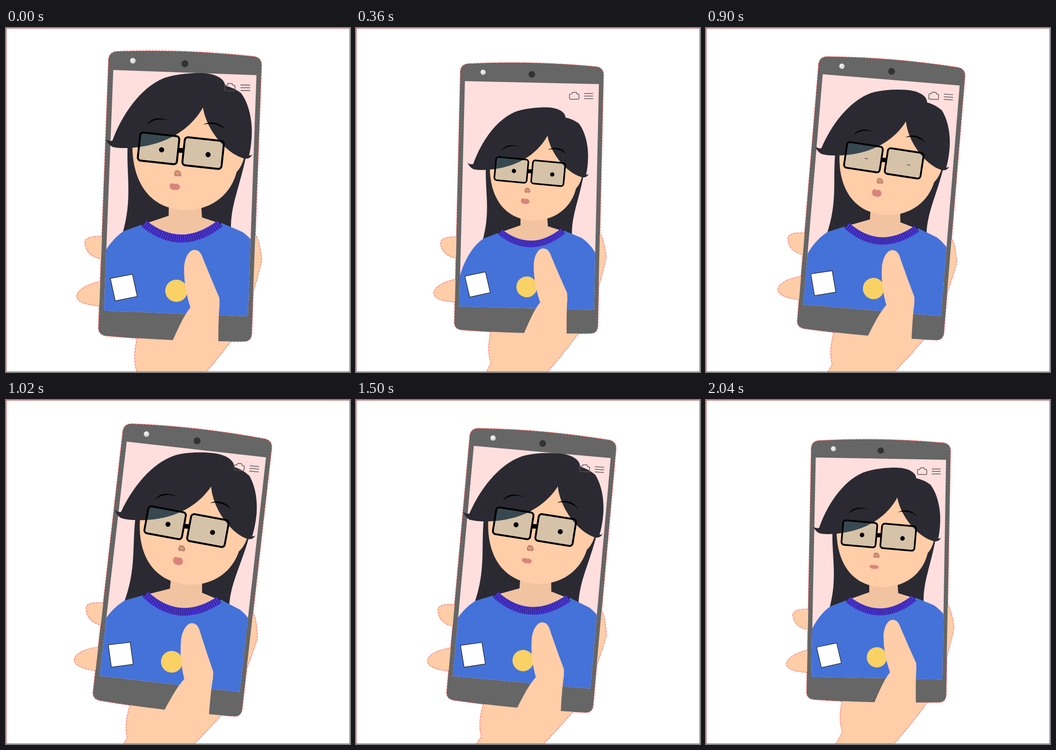
An HTML page with a canvas for the animation above (2100 ms loop, 748 by 748 pixels).

```html
<!DOCTYPE html>
<html lang="en">
<head>
<meta charset="utf-8">
<title>Selfie</title>
<style>
  html, body { margin: 0; width: 100%; height: 100%; overflow: hidden; background: #fff; }
  canvas { display: block; width: 748px; height: 748px; }
</style>
</head>
<body>
<canvas id="stage" width="748" height="748"></canvas>
<script>
const ctx = document.getElementById('stage').getContext('2d');
const LOOP = 2100, STEP = 60;
const SKIN = '#ffcda8', HAIR = '#2b2a32', GREY = '#666', FRINGE = '#ff5656';

// Smooth monotone curve through [time, value] keys
function track(keys) {
  const n = keys.length, gaps = [], slopes = new Array(n).fill(0);
  for (let i = 0; i < n - 1; i++) {
    gaps.push((keys[i + 1][1] - keys[i][1]) / (keys[i + 1][0] - keys[i][0]));
  }
  slopes[0] = gaps[0];
  for (let i = 1; i < n - 1; i++) {
    const a = gaps[i - 1], b = gaps[i];
    slopes[i] = a * b > 0 ? 2 * a * b / (a + b) : 0;
  }
  return t => {
    let i = 0;
    while (i < n - 2 && t > keys[i + 1][0]) i++;
    const [t0, v0] = keys[i], [t1, v1] = keys[i + 1], d = t1 - t0;
    const u = Math.min(1, Math.max(0, (t - t0) / d)), u2 = u * u, u3 = u2 * u;
    return v0 * (2 * u3 - 3 * u2 + 1) + v1 * (3 * u2 - 2 * u3)
      + d * (slopes[i] * (u3 - 2 * u2 + u) + slopes[i + 1] * (u3 - u2));
  };
}

const phoneScale = track([[0, 1.099], [180, 1.053], [400, 1.026], [660, 1.022], [900, 1.054],
  [1080, 1.081], [1200, 1.082], [1320, 1.079], [1500, 1.054], [1620, 1.027], [1820, 1.002], [2040, 1]]);
const phoneTilt = track([[0, 1.07], [180, 0.62], [400, 0.25], [660, 0.18], [900, 3.67],
  [1080, 5.85], [1200, 5.92], [1320, 5.75], [1500, 4.07], [1620, 2.1], [1820, 0.12], [2040, 0]]);
const girlScale = track([[0, 1.046], [180, 0.965], [400, 0.918], [660, 0.91], [900, 1.002],
  [1200, 1.067], [1500, 1.046], [2040, 1]]);
const lipHeight = track([[0, 12.6], [180, 12.6], [660, 13], [900, 15], [1200, 15.5], [1500, 10], [2040, 8.5]]);

const P = d => new Path2D(d);
const phone = P('M229 106 Q229.5 90 245 88.5 Q380 81 517 93.5 Q531.5 96 531.5 111 L522 641 Q521.5 656 508 657 ' +
  'Q365 660.5 234 651 Q219 649 219 635 Z');
const screen = P('M238.6 125 L522 130 L514 607.5 L229 601.7 Z');
const wrist = P('M340 600 L296 657 C291 676 290 705 297 721 C293 730 287 739 281 752 L276 790 L374 790 L405 752 ' +
  'Q450 700 481 657 L500 600 Z');
const fingers = [
  P('M230 455 C205 454 190 457 189 467 C190 484 202 499 230 499 Z'),
  P('M230 543 C199 547 175 561 175 574 C176 588 204 592 230 592 Z'),
  P('M515 447 L526 447 Q533 455 539 494 Q537 508 523 560 L515 560 Z')
];
const thumb = P('M386 515 C386 496 394 478 406 478 C416 478 420 486 424 497 Q440 535 457 572 L457.5 586 ' +
  'Q455.5 610 456.5 662 L456 690 L340 690 L366 658 C378 630 388 607 400 592 Q386 552 386 515 Z');
const camera = P('M462 151 L464.5 151 L466.5 147.5 L474 147.5 L476 151 L478 151 Q480 151 480 153 L480 160 ' +
  'Q480 162 478 162 L462 162 Q460 162 460 160 L460 153 Q460 151 462 151 Z');
const menu = P('M491 150 H510 M491 155.3 H510 M491 160.8 H510');
const badge = P('M240.5 537.5 L284 528.3 L294.3 572 L251 581.8 Z');

const backHair = P('M275 280 C273 345 287 385 268 455 L300 470 L474 450 C469 400 489 362 500 298 Z');
const neck = P('M355 395 L416 395 L418 420 L450 430 Q380 482 310 434 L355 418 Z');
const sweater = P('M270 449 L304 436 Q380 488 456 430 L495 446 Q506 453 518 467 Q560 520 575 690 L203 690 ' +
  'Q206 575 214 545 C224 504 242 469 270 449 Z');
const face = P('M284 280 C283 350 315 407 388 407 C440 405 473 372 482 333 C488 326 493 318 496 303 L418 205 Z');
const bangs = P('M233 275 Q239 280 246 278 C262 232 295 178 341 158 C365 149 395 147 412 147 ' +
  'C440 147 457 158 457 170 Q475 174 488 184 C506 208 511 245 509 270 Q508 288 505 301 Q508 302 511 299 ' +
  'Q508 307 499 307.5 C468 303 425 260 416 212 C399 244 360 283 285 290.5 Q262 293 247 290 Q238 286 233 275 Z');
const brows = P('M310 248 C318 232 336 232 351 238 C336 234 321 236 310 248 Z ' +
  'M417 245 C429 236 449 239 459 253 C447 243 430 240 417 245 Z');
const nose = P('M366.5 333 Q370 332 374 333.5 Q378 340 376 342 Q373 343.5 371 341.5 Q367 343.5 365 341.5 Q364 338 366.5 333 Z');
const lips = P('M-10 -1 C-9 -5 -4 -6 -1 -3.6 C3 -6 8 -4 10 0 C9 5 4 5 0 5 C-5 5 -9 4 -10 -1 Z');

function fill(path, color) { ctx.fillStyle = color; ctx.fill(path); }
function line(path, color, width) { ctx.strokeStyle = color; ctx.lineWidth = width; ctx.stroke(path); }
function oval(x, y, rx, ry, color) {
  ctx.fillStyle = color;
  ctx.beginPath();
  ctx.ellipse(x, y, rx, ry, 0.09, 0, Math.PI * 2);
  ctx.fill();
}
function group(draw) { ctx.save(); draw(); ctx.restore(); }
function about(x, y, scale, deg = 0) {
  ctx.translate(x, y);
  ctx.rotate(deg * Math.PI / 180);
  ctx.scale(scale, scale);
  ctx.translate(-x, -y);
}

function collar() {
  const a = [308.5, 434], b = [380, 489], c = [452.5, 431], ribs = 36;
  line(P(`M${a} Q${b} ${c}`), '#4a36d4', 15);
  ctx.beginPath();
  for (let i = 0; i <= ribs; i++) {
    const u = i / ribs, v = 1 - u;
    const at = k => v * v * a[k] + 2 * u * v * b[k] + u * u * c[k];
    const dir = k => v * (b[k] - a[k]) + u * (c[k] - b[k]);
    const len = Math.hypot(dir(0), dir(1)) / 7;
    const nx = -dir(1) / len, ny = dir(0) / len;
    ctx.moveTo(at(0) - nx, at(1) - ny);
    ctx.lineTo(at(0) + nx, at(1) + ny);
  }
  ctx.strokeStyle = '#21145c';
  ctx.lineWidth = 0.95;
  ctx.stroke();
}

function lens(x, y) {
  group(() => {
    ctx.translate(x, y);
    ctx.rotate(0.088);
    ctx.beginPath();
    ctx.roundRect(-37.2, -26.7, 74.4, 53.4, 6);
    ctx.fillStyle = 'rgba(92,160,168,.25)';
    ctx.fill();
    ctx.strokeStyle = '#000';
    ctx.lineWidth = 3.7;
    ctx.stroke();
  });
}

function head(t) {
  fill(face, SKIN);
  fill(bangs, HAIR);
  fill(brows, '#000');
  lens(333.5, 291);
  lens(418, 298.3);
  ctx.fillStyle = '#000';
  ctx.fillRect(370, 289.5, 11, 9);
  const open = Math.min(1, Math.abs(t - 900) / 90);
  for (const [x, y] of [[339.3, 293.5], [427.3, 301]]) {
    oval(x, y, 4.1 + 0.8 * open, 0.5 + 4.4 * open, '#000');
  }
  fill(nose, '#d9957b');
  line(nose, '#6f4a3c', 0.8);
  group(() => {
    ctx.translate(365.6, 362.8);
    ctx.rotate(0.05);
    ctx.scale(1, lipHeight(t) / 10);
    fill(lips, '#d9837c');
  });
}

function draw(t) {
  const girl = () => about(388, 563, girlScale(t));
  ctx.fillStyle = '#fff';
  ctx.fillRect(0, 0, 748, 748);

  group(() => {
    about(358, 442, phoneScale(t), phoneTilt(t));
    const hand = [wrist, ...fingers];
    ctx.setLineDash([5, 1.3]);
    for (const part of [...hand, phone]) line(part, FRINGE, 1.9);
    ctx.setLineDash([]);
    for (const part of hand) fill(part, SKIN);
    fill(phone, GREY);
    oval(380, 110, 7, 7, '#333');
    oval(277, 106, 5.6, 5.6, '#d8d8d8');
    oval(275.8, 104.6, 3.2, 3.2, '#eee');
    fill(screen, '#ffdede');

    group(() => {
      ctx.clip(screen);
      girl();
      fill(backHair, HAIR);
      fill(neck, '#f2c3a1');
      fill(sweater, '#4472d9');
      collar();
    });
    group(() => { girl(); head(t); });

    line(camera, '#555', 1.4);
    line(menu, '#555', 1.4);
    fill(badge, '#fff');
    line(badge, '#222', 1.2);
    oval(371.5, 559.5, 22, 22, '#f9d164');
    fill(thumb, SKIN);
  });

  ctx.strokeStyle = '#a84646';
  ctx.lineWidth = 1;
  ctx.strokeRect(0.5, 0.5, 747, 747);
}

const start = performance.now();
function tick(now) {
  const t = Math.max(0, now - start) % LOOP;
  draw(Math.floor(t / STEP) * STEP);
  requestAnimationFrame(tick);
}
draw(0);
requestAnimationFrame(tick);
</script>
</body>
</html>
```
